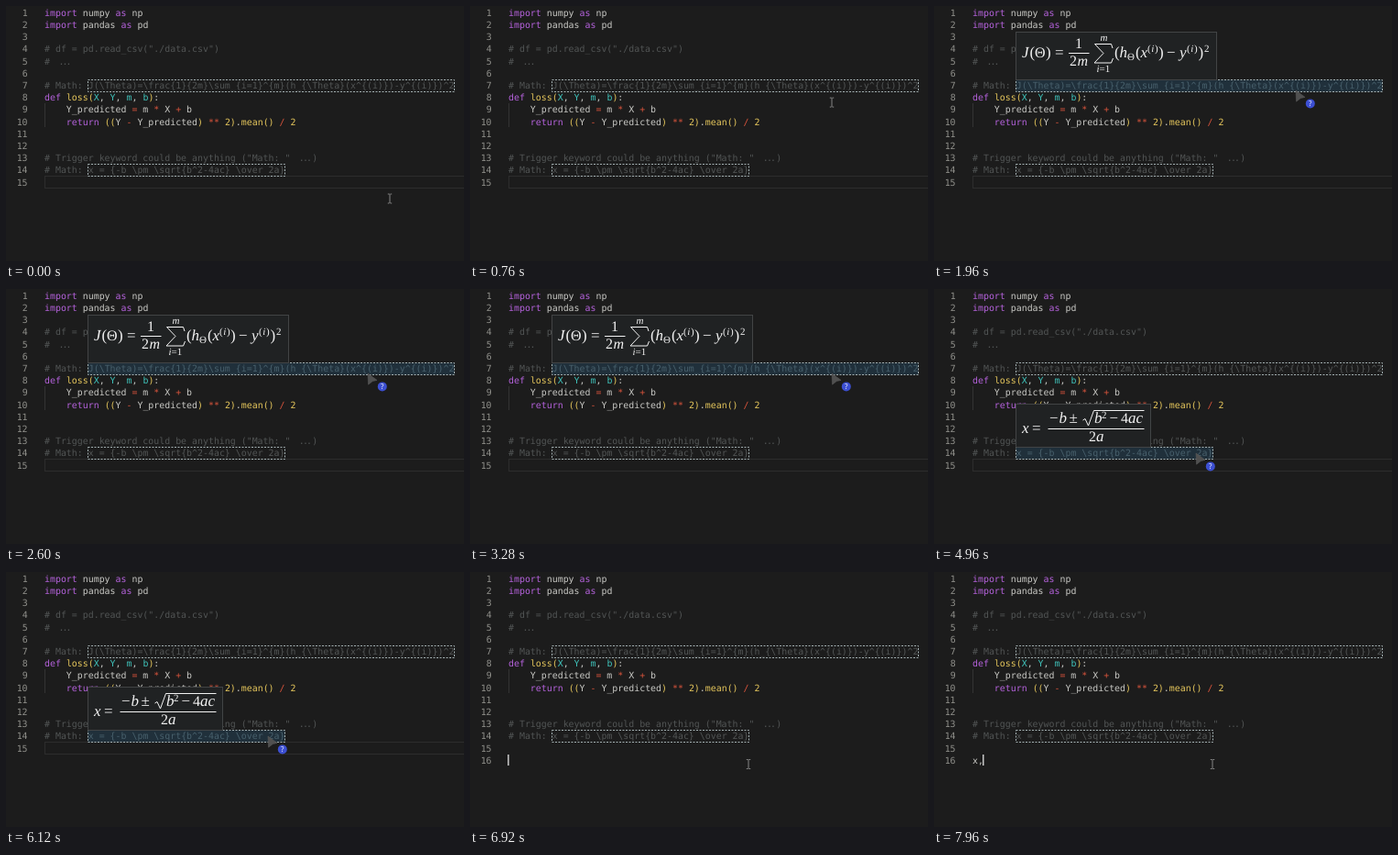
These frames come from a looping animation (500x278 px, 8 s). An HTML page:

```html
<!DOCTYPE html>
<html lang="en">
<head>
<meta charset="utf-8">
<title>Math preview in a code editor</title>
<style>
  html, body { margin: 0; width: 100%; height: 100%; overflow: hidden; background: #1c1c1c; }
  svg { display: block; width: 100vw; height: 100vh; text-rendering: geometricPrecision; }
  .code text { font: 9.92px "DejaVu Sans Mono", "Noto Sans Mono", monospace; fill: #c9c9c5; white-space: pre; }
  .code .num { fill: #8f8f8a; text-anchor: end; }
  .k { fill: #b562dc; }
  .c { fill: #525555; }
  .f { fill: #e6c75c; }
  .p { fill: #3fc3bb; }
  .o { fill: #d9543c; }
  .math text { font-family: "Liberation Serif", "Noto Serif", serif; fill: #f2f2f2; }
  .math .i { font-style: italic; }
  .math path { fill: none; stroke: #f2f2f2; }
  .panel { fill: #202223; stroke: #424445; }
  .link { fill: none; stroke: #a4b1b3; stroke-dasharray: 2 1.5; }
  .link.over { fill: #20303b; }
  .link.over + text .c { fill: #48606c; }
</style>
</head>
<body>
<svg id="stage" viewBox="0 0 500 278" preserveAspectRatio="none"></svg>
<script>
const LOOP = 8000, LEFT = 42, CHAR = 5.97, PITCH = 13.2;
const stage = document.getElementById("stage");
const baseline = line => 10.7 + PITCH * (line - 1);

// Narrow ellipsis, as a code ligature draws it
const dots = '<tspan dx="3.5" letter-spacing="-1.9">...</tspan>';

// Markup: {class:text} colours a token
const LINES = {
  1: "{k:import} numpy {k:as} np",
  2: "{k:import} pandas {k:as} pd",
  4: '{c:# df = pd.read_csv("./data.csv")}',
  5: "{c:# ...}",
  7: "{c:# Math: }",
  8: "{k:def} {f:loss(}{p:X}, {p:Y}, {p:m}, {p:b}{f:)}:",
  9: "    Y_predicted {o:=} m {o:*} X {o:+} b",
  10: "    {k:return} {f:((}Y {o:-} Y_predicted{f:)} {o:**} {f:2)}.{f:mean()} {o:/} {f:2}",
  13: '{c:# Trigger keyword could be anything ("Math: " ...)}',
  14: "{c:# Math: }"
};
const FORMULAS = {
  7: "J(\\Theta)=\\frac{1}{2m}\\sum_{i=1}^{m}(h_{\\Theta}(x^{(i)})-y^{(i)})^2",
  14: "x = {-b \\pm \\sqrt{b^2-4ac} \\over 2a}"
};

const paint = source => source
  .replace(/\{(\w):(.*?)\}/g, '<tspan class="$1">$2</tspan>')
  .replace("...)", dots + '<tspan dx="2.2">)</tspan>')
  .replace("# ...<", "# " + dots + "<");
const row = (line, content, attrs = "") =>
  `<text x="${LEFT}" y="${baseline(line)}" ${attrs}>${content}</text>`;
const number = line =>
  `<text class="num" ${line === 16 ? 'id="lastNum"' : ""} x="23.6" y="${baseline(line)}">${line}</text>`;

function link(line, id) {
  const body = FORMULAS[line], x = LEFT + 8 * CHAR;
  return `<rect id="${id}" class="link" x="89.5" y="${Math.round(baseline(line) - 10.2) + 0.5}"
    width="${Math.round(body.length * CHAR)}" height="13"/>
    <text x="${x}" y="${baseline(line)}"><tspan class="c">${body}</tspan></text>`;
}

// Each glyph run: x, baseline, size, text; a leading "/" makes it italic
const runs = list => list.map(([x, y, size, text]) => {
  const italic = text.startsWith("/");
  return `<text x="${x}" y="${y}" font-size="${size}" class="${italic ? "i" : ""}">${italic ? text.slice(1) : text}</text>`;
}).join("");

function popup(id, box, list, path) {
  const [x, y, w, h] = box;
  return `<g id="${id}" class="math"><rect class="panel" x="${x}" y="${y}" width="${w}" height="${h}"/>
    ${runs(list)}<path d="${path}"/></g>`;
}

const lossPopup = popup("lossPopup", [89.5, 28.5, 219, 52], [
  [96, 56, 17, "/J"], [104.5, 56, 17, "("], [110, 56, 16, "Θ"], [122, 56, 17, ")"], [132, 56, 17, "="],
  [154, 46, 16, "1"], [148, 65, 16, "2"], [156.5, 65, 16, "/m"],
  [181.5, 38, 11, "/m"], [177.5, 72, 11, "/i"], [180.5, 72, 11, "=1"],
  [197, 56, 17, "("], [202.5, 56, 17, "/h"], [211, 59, 11, "Θ"], [220, 56, 17, "("], [225.5, 56, 17, "/x"],
  [233, 49.5, 11, "("], [237.2, 49.5, 11, "/i"], [241, 49.5, 11, ")"], [245, 56, 17, ")"],
  [254, 56, 17, "−"], [268, 56, 17, "/y"],
  [276, 49.5, 11, "("], [280.2, 49.5, 11, "/i"], [284, 49.5, 11, ")"], [288.5, 56, 17, ")"], [295, 49.5, 11, "2"]
], "M147 51.5H169.5 M195 46L193.5 41.5H175.5L185 51.5L175 62H193.5L195.5 57");

const rootPopup = popup("rootPopup", [89.5, 125.5, 147, 47], [
  [96, 157, 17, "/x"], [107, 157, 17, "="],
  [126, 146, 17, "−"], [136.5, 146, 17, "/b"], [147.5, 146, 17, "±"],
  [175, 146, 17, "/b"], [183, 141, 11, "2"], [191.5, 146, 17, "−"], [204, 146, 16, "4"],
  [212, 146, 17, "/a"], [220.5, 146, 17, "/c"], [169, 166, 16, "2"], [177, 166, 17, "/a"]
], "M124.5 152.5H229.5 M162.5 143L165 141.5L168.5 149L174.5 132.5H229.5");

const lines = Object.entries(LINES).map(([line, source]) => row(+line, paint(source))).join("");
const numbers = Array.from({ length: 16 }, (_, i) => number(i + 1)).join("");

stage.innerHTML = `
  <rect id="current" x="42.5" y="185.5" width="460" height="13" fill="none" stroke="#2d2d2d"/>
  <path d="M42.5 106V132" stroke="#333"/>
  <g class="code">${numbers}${link(7, "lossLink")}${link(14, "rootLink")}${lines}${row(16, "", 'id="typed"')}</g>
  <rect id="caret" width="1.3" height="12" fill="#e4e4e4"/>
  ${lossPopup}${rootPopup}
  <path id="beam" d="M-2.2 -5H-.6L0 -4.4L.6 -5H2.2 M0 -4.4V4.4 M-2.2 5H-.6L0 4.4L.6 5H2.2"
    fill="none" stroke="#858585"/>
  <g id="help">
    <path d="M0 0L10 7.4L5.3 8.4L.6 12.2Z" fill="#505050" stroke="#5a5a5a" stroke-width=".6"/>
    <circle cx="15.8" cy="14.4" r="5" fill="#3c4fd2"/>
    <text x="15.8" y="17.2" text-anchor="middle" fill="#fff" font-family="Open Sans, sans-serif"
      font-size="8">?</text>
  </g>`;

// Pointer stops: time, x, y
const PATH = [
  [0, 419, 210], [160, 419, 210], [680, 395, 106], [780, 395, 105], [960, 395, 92],
  [3440, 395, 92], [3920, 300, 192], [4080, 289, 203], [4200, 288, 196], [4320, 286, 179],
  [6240, 286, 179], [6560, 304, 209.5], [LOOP, 304, 209.5]
];
const TYPING = [[7080, "x"], [7680, "x,"]];
const ENTER = 6880;

const part = id => document.getElementById(id);
const show = (id, on) => part(id).setAttribute("visibility", on ? "visible" : "hidden");
const within = (t, from, to) => t >= from && t < to;
const move = (id, x, y) => part(id).setAttribute("transform", `translate(${x} ${y})`);

function pointerAt(t) {
  const i = PATH.findIndex((stop, n) => n && t <= stop[0]);
  const [t0, x0, y0] = PATH[i - 1], [t1, x1, y1] = PATH[i];
  const u = (t - t0) / (t1 - t0), e = u * u * (3 - 2 * u);
  return [x0 + (x1 - x0) * e, y0 + (y1 - y0) * e];
}

function render(t) {
  const overLoss = within(t, 880, 3520), overRoot = within(t, 4240, 6320);
  const [x, y] = pointerAt(t);
  move("beam", x, y);
  move("help", x, y);
  show("help", overLoss || overRoot);
  show("beam", !overLoss && !overRoot);
  part("lossLink").classList.toggle("over", overLoss);
  part("rootLink").classList.toggle("over", overRoot);
  show("lossPopup", within(t, 1240, 3600));
  show("rootPopup", within(t, 4600, 6400));

  const keys = TYPING.filter(([time]) => t >= time);
  const [lastKey, text] = keys.length ? keys[keys.length - 1] : [ENTER, ""];
  part("typed").textContent = text;
  show("lastNum", t >= ENTER);
  show("current", t < ENTER);
  show("caret", t >= ENTER && (t - lastKey) % 1000 < 500);
  move("caret", LEFT + text.length * CHAR - 0.8, 199);
}

const start = performance.now();
function tick() {
  render((performance.now() - start) % LOOP);
  requestAnimationFrame(tick);
}
render(0);
requestAnimationFrame(tick);
</script>
</body>
</html>
```
